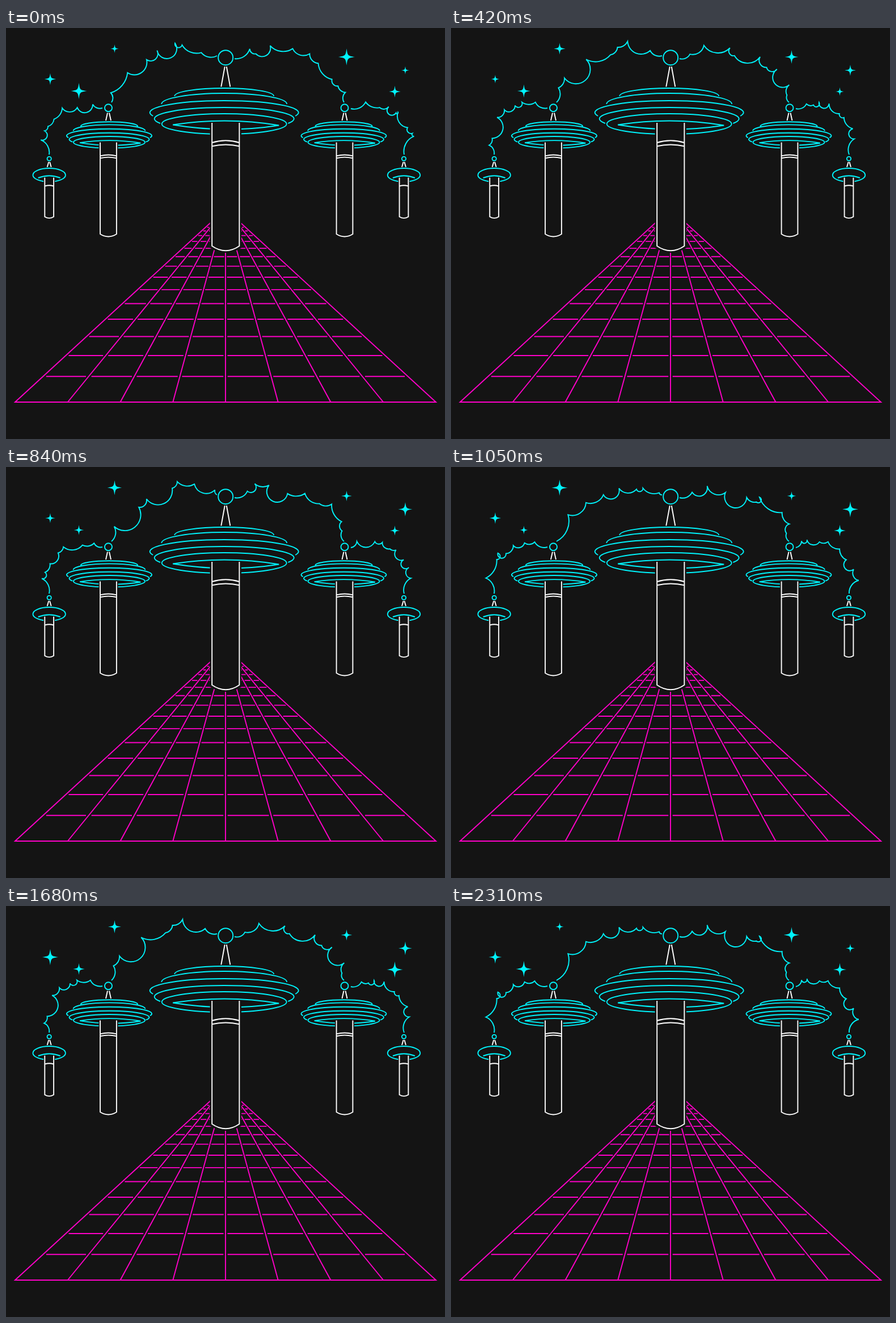
Recreate the animation shown at these times as an HTML page. Size 774 by 724 pixels, loop 2520 ms.

```html
<!DOCTYPE html>
<html lang="en">
<head>
<meta charset="utf-8">
<title>Sparking towers</title>
<style>
  html, body { margin: 0; width: 100%; height: 100%; overflow: hidden; background: #141414; }
  svg { display: block; width: 774px; height: 724px; fill: none; stroke-width: 1.9; }
  path, circle, ellipse { vector-effect: non-scaling-stroke; }
  .cyan { stroke: #00f3fb; }
  .white { stroke: #fff; }
  .pink { stroke: #ff00c8; }
  .star { fill: #00f3fb; }
  .mask { fill: #141414; }
</style>
</head>
<body>
<svg id="stage" viewBox="0 0 774 724"></svg>
<script>
const STEP = 210, STEPS = 12, POSES = 6;

// Guide curves of the four sparks: cubic Bezier points, scallop count, arc sweep
const GUIDES = [
  { pts: [[372, 49], [340, 10], [200, 40], [186, 131]], count: 8, sweep: 1 },
  { pts: [[403, 54], [440, 5], [625, 60], [596, 131]], count: 10, sweep: 0 },
  { pts: [[170, 141], [120, 115], [38, 170], [76, 223]], count: 8, sweep: 1 },
  { pts: [[608, 142], [655, 112], [745, 165], [702, 223]], count: 9, sweep: 0 }
];

// x, y and the step at which the star is largest
const STARS = [[78, 90, 8.5], [128.5, 111, 11.5], [191.5, 36.5, 5.5],
  [600.5, 51, 11.8], [704, 74.5, 5.8], [685.5, 112, 8.5]];
const ARM = 'C.13-.13.13-.13 1 0C.13.13.13.13 0 1C-.13.13-.13.13-1 0C-.13-.13-.13-.13 0-1Z';
const STAR = 'M0-1' + ARM;

const path = (cls, d, extra = '') => `<path class="${cls}" d="${d}" ${extra}/>`;
const ball = (x, y, r) => `<circle class="cyan" cx="${x}" cy="${y}" r="${r}"/>`;

function seeded(seed) {
  return () => {
    seed = (seed + 0x6D2B79F5) | 0;
    let t = Math.imul(seed ^ (seed >>> 15), 1 | seed);
    t = (t + Math.imul(t ^ (t >>> 7), 61 | t)) ^ t;
    return ((t ^ (t >>> 14)) >>> 0) / 4294967296;
  };
}

function bezier(p, t) {
  const u = 1 - t;
  const at = k => u * u * u * p[0][k] + 3 * u * u * t * p[1][k] + 3 * u * t * t * p[2][k] + t * t * t * p[3][k];
  return [at(0), at(1)];
}

// Unevenly spaced cusps near the guide, joined by circular arcs of varied depth
function spark({ pts, count, sweep }, seed) {
  const rand = seeded(seed);
  const wobble = Math.hypot(pts[3][0] - pts[0][0], pts[3][1] - pts[0][1]) * 0.05;
  const steps = Array.from({ length: count }, () => 0.45 + rand());
  const total = steps.reduce((a, b) => a + b);
  let [px, py] = pts[0], d = `M${px} ${py}`, t = 0;
  steps.forEach((step, i) => {
    t += step / total;
    const last = i === count - 1, off = last ? 0 : wobble;
    let [x, y] = bezier(pts, Math.min(t, 1));
    x += (rand() * 2 - 1) * off;
    y += (rand() * 2 - 1) * off;
    const bulge = i === 0 || last ? 0.18 : 0.15 + 0.5 * rand() ** 2;
    const r = Math.hypot(x - px, y - py) * (0.25 + bulge * bulge) / (2 * bulge);
    d += `A${r} ${r} 0 ${bulge > 0.5 ? 1 : 0} ${sweep} ${x} ${y}`;
    [px, py] = [x, y];
  });
  return d;
}

function floor() {
  const cx = 387, vy = 318.7, base = 659, depth = base - vy;
  const slope = i => (i - 4) * 92.75 / depth;
  let d = `M16 ${base}L${cx} ${vy}L758 ${base}Z`;
  for (let i = 1; i < 8; i++) d += `M${cx} ${vy}L${cx + slope(i) * depth} ${base}`;
  // Row spacing shrinks toward the horizon
  for (let row = 0, y = 613.7; row < 14; y -= 36.7 - 3.25 * row + 0.06 * row * row, row++) {
    const half = 2 + 2 * (y - 345) / 314;
    const gap = s => half * Math.hypot(1, s);
    for (let i = 0; i < 8; i++) {
      const a = slope(i), b = slope(i + 1);
      const x1 = cx + a * (y - vy) + gap(a), x2 = cx + b * (y - vy) - gap(b);
      if (x2 > x1) d += `M${x1} ${y}H${x2}`;
    }
  }
  return path('pink', d);
}

function column(cx, half, top, bottom, sag, bands, pad) {
  const l = cx - half, r = cx + half;
  let d = `M${l} ${top}V${bottom}Q${cx} ${bottom + sag * 2} ${r} ${bottom}V${top}`;
  for (const [y, rise] of bands) d += `M${l} ${y}Q${cx} ${y - 2 * rise} ${r} ${y}`;
  const low = bottom + pad;
  const mask = `M${l - pad} ${top}H${r + pad}V${low}Q${cx} ${low + sag * 2} ${l - pad} ${low}Z`;
  return path('mask', mask) + path('white', d);
}

function antenna(cx, y1, y2, near, far) {
  return path('white', `M${cx - near} ${y1}L${cx - far} ${y2}M${cx + near} ${y1}L${cx + far} ${y2}`);
}

// Stacked rings, drawn around x = 0 with the top at y = 0
function disc(x, y, k) {
  const rings = 'M-87.5 14A87.5 14 0 0 1 87.5 14M-110.5 28A110.5 19 0 0 1 110.5 28' +
    'M-125.5 49A131 21 0 1 1 125.5 49M-112.7 62A123 20 0 1 1 112.7 62' +
    'M-110 63A110 18 0 0 1 110 63A110 18 0 0 1-110 63Z' +
    'M-90.5 64.5Q3.5 50 96.5 65.5Q3.5 80-90.5 64.5Z';
  return path('cyan', rings, `transform="translate(${x} ${y}) scale(${k})"`);
}

function bigTower() {
  return disc(384.7, 106, 1) + column(387.3, 24.1, 167, 384, 8.3, [[202, 3.7], [208.3, 2.8]], 3.6) +
    antenna(387.3, 68, 103.5, 1.5, 8) + ball(387.2, 52.2, 13);
}

function midTower(cx, discX) {
  return disc(discX, 165.2, 0.573) + column(cx, 14.4, 201.5, 363, 4.5, [[225.3, 1.8], [229.3, 1.7]], 2.6) +
    antenna(cx, 149.5, 163, 1.5, 4.5) + ball(cx, 140.7, 6.5);
}

function farTower(cx) {
  return `<ellipse class="cyan" cx="${cx}" cy="259" rx="28.8" ry="12"/>` +
    path('cyan', `M${cx - 19.5} 264Q${cx} 256.5 ${cx + 19.5} 264`) +
    column(cx, 7.9, 263.5, 332.5, 2.4, [[278.7, 1.4]], 2.2) +
    antenna(cx, 236, 245, 0.9, 3.5) + ball(cx, 230.2, 3.6);
}

const stage = document.getElementById('stage');
stage.innerHTML = floor() + farTower(76.2) + farTower(701.5) +
  midTower(180.5, 182) + midTower(597, 595.5) + bigTower() +
  '<path id="sparks" class="cyan"/>' +
  STARS.map(() => path('star', STAR)).join('');

const sparks = document.getElementById('sparks');
const stars = [...stage.querySelectorAll('.star')];
const arches = Array.from({ length: POSES }, (_, pose) =>
  GUIDES.map((guide, i) => spark(guide, 40 + pose * GUIDES.length + i)).join(''));

function starSize(step, peak) {
  const away = Math.abs(step - peak) % STEPS;
  return 15 - 8.2 * Math.min(away, STEPS - away) / 6;
}

let shown = -1;
function draw() {
  const step = Math.floor(performance.now() / STEP) % STEPS;
  if (step !== shown) {
    shown = step;
    sparks.setAttribute('d', arches[step % POSES]);
    STARS.forEach(([x, y, peak], i) =>
      stars[i].setAttribute('transform', `translate(${x} ${y}) scale(${starSize(step, peak)})`));
  }
  requestAnimationFrame(draw);
}
draw();
</script>
</body>
</html>
```
